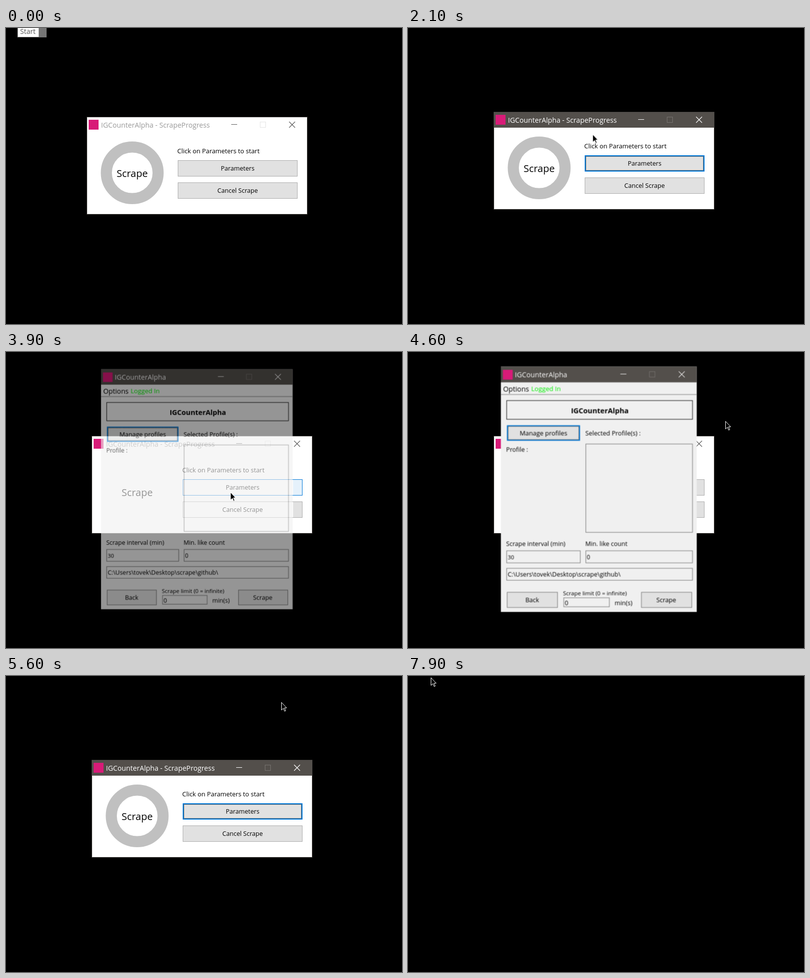
Write an HTML page that moves like this. It is 800 px wide and 600 px high and loops after 8000 ms.

```html
<!DOCTYPE html>
<html lang="en">
<head>
<meta charset="utf-8">
<title>Scrape progress</title>
<style>
html, body { margin: 0; width: 100%; height: 100%; overflow: hidden; background: #000; }
svg { display: block; width: 800px; height: 600px; }
text { font-family: "Open Sans", "Noto Sans", sans-serif; font-size: 12.4px; white-space: pre; }
.mid { text-anchor: middle; }
.line { fill: none; stroke: #707070; }
.btn { fill: #e1e1e1; stroke: #adadad; }
.dark { stroke: #707070; }
.hot { fill: #e5f1fb; stroke: #0078d7; }
.ring2 { fill: none; stroke: #0078d7; stroke-width: 2; }
.dots { fill: none; stroke: #000; stroke-dasharray: 1 1; }
.logo { fill: #d81b78; }
.idle { --bg: #fff; --fg: #999; --gl: #5c5c5c; --mx: #e4e4e4; }
.live { --bg: #534f4b; --fg: #fff; --gl: #fff; --mx: #777370; }
.bg { fill: var(--bg); }
.fg { fill: var(--fg); }
.gl { fill: none; stroke: var(--gl); }
.mx { fill: none; stroke: var(--mx); }

/* one 8 s clock; percent = ms / 80 */
.a { animation: 8s step-end infinite; }
#tip { animation-name: tip; }
#win { animation-name: win; }
.live.a { animation-name: live; }
#dots { animation-name: live; }
#min { animation-name: min; }
#ring { animation-name: ring; }
#veil { animation-name: veil; }
#hot { animation-name: hot; }
#focus { animation-name: focus; }
#hot2 { animation-name: hot2; }
#set { animation-name: set; transform-origin: 385.5px 278.5px; }
#close { animation-name: close; }
#glyphs { animation-name: glyphs; }
#cur { animation-name: cur; }

@keyframes tip { 0% { opacity: 1 } 1.25%, 100% { opacity: 0 } }
@keyframes win {
  0%, 18.75% { transform: translate(164px, 181px); opacity: 1 }
  20% { transform: translate(166px, 166px) }
  21.25% { transform: translate(167px, 162px) }
  22.5% { transform: translate(171px, 163px) }
  23.75% { transform: translate(176px, 167px) }
  25% { transform: translate(174px, 171px); opacity: 1 }
  83.75%, 100% { transform: translate(174px, 171px); opacity: 0 }
}
@keyframes live {
  0%, 47.5% { opacity: 0 }
  18.75%, 67.5%, 100% { opacity: 1 }
}
@keyframes min {
  0% { opacity: 0 }
  78.75%, 82.5%, 100% { opacity: .2 }
  81.25% { opacity: .35 }
}
@keyframes ring { 0%, 70%, 100% { opacity: 1 } 47.5% { opacity: 0 } }
@keyframes veil { 0%, 70%, 100% { opacity: 0 } 47.5% { opacity: 1 } }
@keyframes hot {
  0%, 23.75%, 31.25%, 50%, 76.25%, 100% { opacity: 0 }
  18.75%, 30%, 33.75%, 73.75% { opacity: 1 }
  75% { opacity: .5 }
}
@keyframes focus {
  0%, 30%, 33.75%, 73.75% { opacity: 0 }
  23.75%, 31.25%, 67.5%, 75%, 100% { opacity: 1 }
}
@keyframes hot2 { 0%, 33.75%, 100% { opacity: 0 } 32.5% { opacity: 1 } }
@keyframes set {
  0% { opacity: 0; transform: scale(.975) }
  47.5% { opacity: .2; transform: scale(.975) }
  48.75% { opacity: .62; transform: scale(.99) }
  50% { opacity: .96; transform: scale(1.007) }
  52.5% { opacity: 1; transform: scale(1.012) }
  66.25% { opacity: .95; transform: scale(1.008) }
  67.5% { opacity: .76; transform: scale(1) }
  68.75% { opacity: .3; transform: scale(.98) }
  70%, 100% { opacity: 0; transform: scale(.975) }
}
@keyframes close {
  0% { opacity: 0; fill: #e81123 }
  62.5%, 65%, 100% { opacity: 1; fill: #e81123 }
  63.75% { opacity: 1; fill: #f1707a }
}
@keyframes glyphs { 0% { opacity: 1 } 67.5%, 100% { opacity: 0 } }
@keyframes cur {
  0% { transform: translate(-50px, -50px) }
  1.25% { transform: translate(80px, 26px); animation-timing-function: steps(5) }
  7.5% { transform: translate(324px, 223px) }
  8.75% { transform: translate(324px, 223px); animation-timing-function: steps(2) }
  11.25% { transform: translate(456px, 206px) }
  12.5% { transform: translate(400px, 195px); animation-timing-function: steps(2) }
  15%, 18.75% { transform: translate(329px, 208px) }
  20% { transform: translate(331px, 193px) }
  21.25% { transform: translate(332px, 189px) }
  22.5% { transform: translate(336px, 190px) }
  23.75% { transform: translate(341px, 194px) }
  25% { transform: translate(339px, 198px); animation-timing-function: steps(3) }
  28.75% { transform: translate(440px, 250px); animation-timing-function: steps(3) }
  32.5% { transform: translate(470px, 310px) }
  33.75% { transform: translate(458px, 288px); animation-timing-function: steps(2) }
  36.25% { transform: translate(453px, 284px) }
  51.25% { transform: translate(453px, 284px); animation-timing-function: steps(5) }
  57.5% { transform: translate(641px, 140px); animation-timing-function: steps(4) }
  62.5% { transform: translate(556px, 53px) }
  70% { transform: translate(556px, 53px); animation-timing-function: steps(3) }
  73.75% { transform: translate(520px, 271px); animation-timing-function: steps(4) }
  78.75% { transform: translate(474px, 180px) }
  90% { transform: translate(474px, 180px); animation-timing-function: steps(2) }
  92.5% { transform: translate(354px, 152px) }
  93.75% { transform: translate(354px, 152px); animation-timing-function: steps(4) }
  98.75%, 100% { transform: translate(46px, 3px) }
}
</style>
</head>
<body>
<svg viewBox="0 0 800 600">
  <defs>
    <g id="bar">
      <rect class="bg" width="444" height="31"/>
      <text class="fg" x="28" y="21" style="font-size:14.2px">IGCounterAlpha - ScrapeProgress</text>
      <path class="gl" d="M291 14.5h12"/>
      <rect class="mx" x="349.5" y="9.5" width="11" height="11"/>
      <path class="gl" d="M408 9l12 12M420 9l-12 12" style="stroke-width:1.2"/>
    </g>
  </defs>
  <rect width="800" height="600"/>

  <g id="tip" class="a">
    <rect x="23" width="59" height="19" fill="#767676"/>
    <rect x="24" width="42" height="18" fill="#fff"/>
    <text x="28.5" y="12" fill="#575757" style="font-size:14px">Start</text>
  </g>

  <!-- progress window -->
  <g id="win" class="a">
    <rect x="-.5" y="-.5" width="445" height="197" fill="#fff" stroke="#4d4a47"/>
    <use href="#bar" class="idle"/>
    <use href="#bar" class="live a"/>
    <rect id="min" class="a" x="268" width="58" height="31" fill="#fff"/>
    <rect class="logo" x="3" y="5" width="20" height="20"/>

    <circle id="ring" class="a" cx="91" cy="112.5" r="52.3" fill="none" stroke="#c0c0c0" stroke-width="22.4"/>
    <text class="mid" x="91" y="121" style="font-size:20px">Scrape</text>
    <text x="182" y="73" style="font-size:12.9px">Click on Parameters to start</text>

    <rect class="btn" x="183.5" y="87.5" width="241" height="32"/>
    <rect id="hot" class="hot a" x="183.5" y="87.5" width="241" height="32"/>
    <rect id="focus" class="ring2 a" x="184" y="88" width="240" height="31"/>
    <rect class="btn" x="183.5" y="132.5" width="241" height="32"/>
    <rect id="hot2" class="hot a" x="183.5" y="132.5" width="241" height="32"/>
    <path id="veil" class="a" d="M184 88h222v31h-222zM184 133h222v31h-222z" fill="#fff"/>
    <rect id="dots" class="dots a" x="185.5" y="89.5" width="237" height="28"/>
    <text class="mid" x="304" y="108" style="font-size:12.6px">Parameters</text>
    <text class="mid" x="304" y="153" style="font-size:12.6px">Cancel Scrape</text>
  </g>

  <!-- settings window -->
  <g id="set" class="a">
    <rect x="190" y="32.5" width="391" height="491.5" fill="#f0f0f0"/>
    <rect x="190" y="32.5" width="391" height="31.5" fill="#534f4b"/>
    <rect id="close" class="a" x="523" y="33" width="58" height="31"/>
    <g id="glyphs" class="a live">
      <path class="gl" d="M428.5 47.5h12M545 42l12 12M557 42l-12 12"/>
      <rect class="mx" x="486.5" y="42.5" width="11" height="11"/>
    </g>
    <rect class="logo" x="194" y="39" width="19.5" height="19.5"/>
    <text x="218" y="54" fill="#fff" style="font-size:14px">IGCounterAlpha</text>

    <text x="194.5" y="82" style="font-size:14px">Options</text>
    <text x="250.5" y="81" fill="#00f000" style="font-size:13px">Logged In</text>
    <path class="line" d="M190 88.5h391"/>

    <rect class="line" x="201.5" y="100.5" width="371" height="37.5" style="stroke:#000"/>
    <text class="mid" x="387.5" y="125.5" style="font-size:14.4px;font-weight:700">IGCounterAlpha</text>

    <rect class="btn" x="203" y="151" width="144" height="29"/>
    <rect class="ring2" x="203" y="151" width="144" height="29"/>
    <rect class="dots" x="204.5" y="152.5" width="141" height="26"/>
    <text class="mid" x="275" y="170" style="font-size:12.7px">Manage profiles</text>
    <text x="358.5" y="170" style="font-size:12.6px">Selected Profile(s) :</text>
    <text x="200.5" y="203">Profile :</text>
    <rect class="line" x="359.5" y="187.5" width="213" height="177"/>

    <text x="200.5" y="391.5">Scrape interval (min)</text>
    <text x="358.5" y="391.5">Min. like count</text>
    <path class="line" d="M201.5 401.5h147v24h-147zM359.5 401.5h213v24h-213zM201.5 436.5h371v24h-371zM315.5 495.5h91v18h-91z"/>
    <text x="203.5" y="418" style="font-size:11.2px">30</text>
    <text x="361.5" y="418" style="font-size:11.6px">0</text>
    <text x="203.5" y="453">C:\Users\tovek\Desktop\scrape\github\</text>

    <rect class="btn dark" x="202.5" y="484.5" width="100.5" height="30.5"/>
    <text class="mid" x="252.5" y="504">Back</text>
    <text x="314" y="491" style="font-size:11.4px">Scrape limit (0 = infinite)</text>
    <text x="317.5" y="510">0</text>
    <text x="417" y="510">min(s)</text>
    <rect class="btn dark" x="470.5" y="484.5" width="100.5" height="30.5"/>
    <text class="mid" x="520" y="504" style="font-size:12.6px">Scrape</text>
  </g>

  <path id="cur" class="a" d="M.5 .5V16L4.4 12.6 6.8 18.4 9 17.4 6.6 11.7H11Z" stroke="#fff"/>
</svg>
</body>
</html>
```
